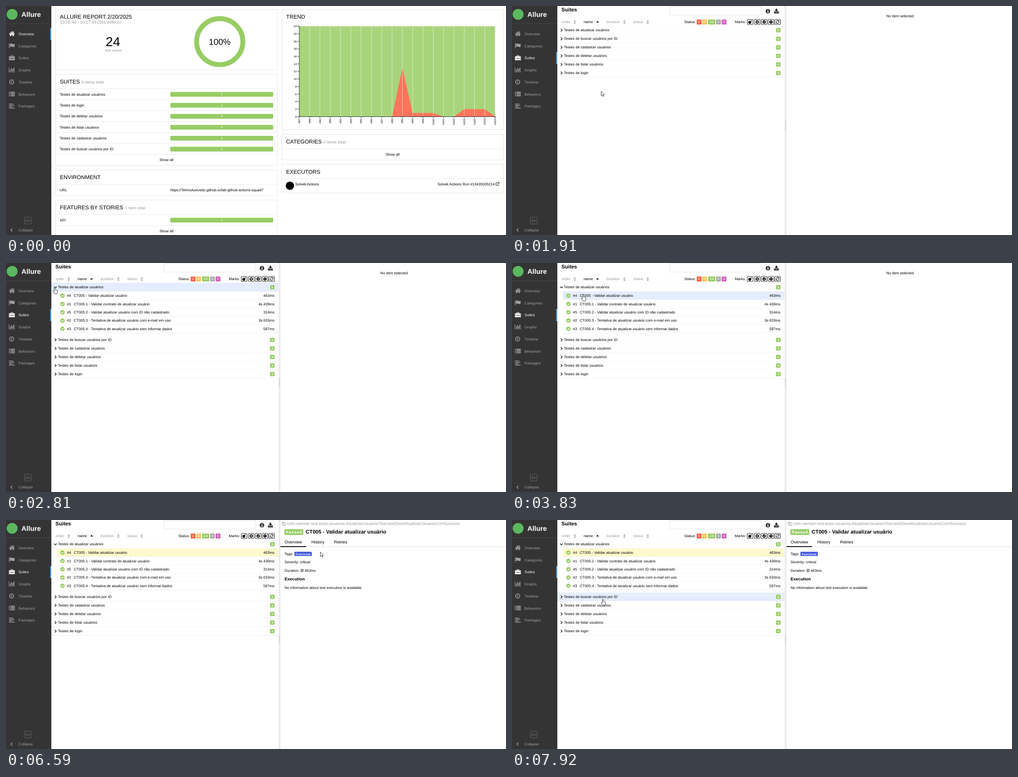
These frames come from a looping animation (1103 by 508 pixels, 7.99 s). An HTML page:

```html
<!DOCTYPE html>
<html lang="en">
<head>
<meta charset="utf-8">
<title>Allure report</title>
<style>
html, body { margin: 0; width: 100%; height: 100%; overflow: hidden; background: #fff; }
svg { display: block; width: 1103px; height: 508px; }
text { font-family: "Liberation Sans", Arial, sans-serif; text-rendering: geometricPrecision; white-space: pre; }
</style>
</head>
<body>
<svg id="stage" viewBox="0 0 1103 508" xmlns="http://www.w3.org/2000/svg"></svg>
<script>
const LOOP = 7990, BODY = 8.1;
const GREEN = '#97cc64', GREY = '#999', LINE = '#e9e9e9', HOVER = '#e4edfd', PICKED = '#fff9cd';

// Drawing helpers; text is placed by its vertical middle
const rect = (x, y, w, h, fill, more = '') =>
  `<rect x="${x}" y="${y}" width="${w}" height="${h}" fill="${fill}" ${more}/>`;
const circle = (x, y, r, fill, more = '') =>
  `<circle cx="${x}" cy="${y}" r="${r}" fill="${fill}" ${more}/>`;
const path = (d, fill, more = '') => `<path d="${d}" fill="${fill}" ${more}/>`;
const stroke = (d, color, width = 1, more = '') =>
  path(d, 'none', `stroke="${color}" stroke-width="${width}" ${more}`);
const text = (x, y, s, size = BODY, fill = '#000', more = '') =>
  `<text x="${x}" y="${y + size * 0.345}" font-size="${size}" fill="${fill}" ${more}>${s}</text>`;
const MID = 'text-anchor="middle"', END = 'text-anchor="end"', BOLD = 'font-weight="700"';
const hline = (x1, x2, y, color = LINE) => stroke(`M${x1} ${y}H${x2}`, color);
const at = (x, y, body) => `<g transform="translate(${x} ${y})">${body}</g>`;

// Sidebar
const ICONS = [
  c => path('M-6.5 .5L0-5.5L2.7-3V-5H4.3V-1.5L6.5.5L5.7 1.4L0-3.8L-5.7 1.4ZM-4.5 1.3L0-2.8L4.5 1.3V5H1.2V2H-1.2V5H-4.5Z', c),
  c => path('M-6.3-5.5H-5V5.5H-6.3ZM-4.3-4C-2-5.5 0-5 1.5-4C3-3.4 4.5-4 6-4.6V2C4 3.2 2.5 3 1 2.3C-1 1.3-2.5 2-4.3 2.8Z', c),
  c => path('M-2.8-3.3V-5.5H2.8V-3.3H6.5V.4H-6.5V-3.3ZM-1.6-3.3H1.6V-4.4H-1.6ZM-6.5 1.3H-1.5V2.3H1.5V1.3H6.5V5.2H-6.5Z', c, 'fill-rule="evenodd"'),
  c => stroke('M-6.3-5.5V4.5H7', c, 1.1) +
    stroke('M-3.5 3V-.2M-.8 3V-4M1.9 3V-2M4.6 3V-5', c, 1.8),
  c => circle(-.5, 0, 4.6, 'none', `stroke="${c}" stroke-width="1.6"`) + stroke('M-.2-2.6V.6H-2.6', c, 1.2),
  c => stroke('M-6.5-4H-4.5M-6.5-1.3H-4.5M-6.5 1.4H-4.5M-6.5 4.1H-4.5M-3.2-4H6.5M-3.2-1.3H6.5M-3.2 1.4H6.5M-3.2 4.1H6.5', c, 1.8),
  c => stroke('M-6.3-4.5H3M-6.3-1.5H5.5M-6.3 1.5H1.5M-6.3 4.5H6.5', c, 1.7)
];
const MENU = ['Overview', 'Categories', 'Suites', 'Graphs', 'Timeline', 'Behaviors', 'Packages'];

function sidebar(active) {
  let s = rect(0, 0, 100, 508, '#343434') + hline(0, 100, 39.5, '#484848') +
    circle(13.5, 18.5, 12, '#5cb860') + text(34, 19, 'Allure', 15.2, '#fff', BOLD);
  MENU.forEach((name, i) => {
    const y = 62 + i * 26.75, on = i === active, c = on ? '#fff' : '#a0a0a0';
    if (on) s += rect(97.5, y - 13.5, 2.5, 27, '#5fa9ec');
    s += at(13, y - 0.5, ICONS[i](c)) + text(27.5, y, name, 8.2, c);
  });
  return s + rect(40.5, 468.5, 15, 15, 'none', 'stroke="#666" rx="1"') +
    text(48, 476, 'En', BODY, '#777', MID) +
    stroke('M14 494L10.7 497.3L14 500.6', '#bbb', 1.2) + text(27.5, 497.5, 'Collapse', 8.2, '#a0a0a0');
}

// Overview page
const SUITES = [['atualizar usuários', 5], ['login', 4], ['deletar usuários', 4],
  ['listar usuários', 4], ['cadastrar usuários', 4], ['buscar usuários por ID', 3]];
const PITCH = 24.3;
const card = (x, y, h) => rect(x + .5, y + .5, 489, h, '#fff', 'stroke="#e4e4e4"');
const heading = (x, y, title, note = '', gap = 0) =>
  text(x, y, title, 12.15) + text(x + gap, y + 1, note, 9.15, GREY);
const bar = (y, n) => rect(362.5, y - 5.2, 227, 10.5, GREEN, 'rx="2"') + text(476, y, n, 7, '#fff', MID);

function trend() {
  const px = i => 647 + i * 432 / 19, py = v => 245.5 - v * 200.5 / 24;
  const failed = [0, 0, 0, 0, 0, 0, 0, 0, 0, 0, 13, 1, 1, 1, 0, 0, 2, 2, 2, 0];
  const runs = [87, 88, 90, 89, 92, 94, 95, 96, 97, 98, 99, 99, 99, 100, 101, 102, 103, 103, 103, 103];
  let s = rect(647, 45, 432, 200.5, '#a8d47b') +
    path('M647 245.5' + failed.map((v, i) => `L${px(i)} ${py(v)}`).join('') + 'Z', '#fe745c');
  runs.forEach((n, i) => {
    const x = px(i);
    if (i) s += stroke(`M${x} 45V245.5`, '#fff', 1, 'opacity=".6"');
    s += stroke(`M${x} 245V249`, '#000', .8) +
      `<g transform="translate(${x} 250.5) rotate(-90)">${text(0, 0, '#' + n, 6, '#000', END)}</g>`;
  });
  for (let v = 0; v <= 24; v += 2)
    s += stroke(`M643 ${py(v)}H647`, '#000', .8) + text(641.5, py(v), v, 6.2, '#000', END);
  return s + stroke('M643 45H647V245.5H1079V249', '#000', .8);
}

function overview(hover) {
  let s = card(109, 7, 134) + text(119, 23.5, 'ALLURE REPORT 2/20/2025', 12.2) +
    text(119, 35.5, '10:16:48 - 10:17:45 (56s 948ms)', 9.25, GREY) +
    text(236, 79.5, '24', 28.6, '#000', MID) + text(236.5, 98.5, 'test cases', BODY, GREY, MID) +
    circle(471.5, 79, 51, 'none', `stroke="${GREEN}" stroke-width="10.8"`) +
    text(471.5, 80, '100%', 18.7, '#000', MID);

  s += card(109, 151, 202) + heading(119, 167.5, 'SUITES', '6 items total', 47.5);
  if (hover) s += rect(110, hover.y, 488, hover.h, HOVER);
  SUITES.forEach(([name, n], i) => {
    const y = 196 + i * PITCH;
    s += hline(110, 598, 183.5 + i * PITCH) + text(118.5, y, 'Testes de ' + name) + bar(y, n);
  });
  s += hline(110, 598, 329.5) + text(354, 341.5, 'Show all', BODY, '#000', MID);

  s += card(109, 363, 57) + heading(119, 380, 'ENVIRONMENT') + hline(110, 598, 396) +
    text(118.5, 408, 'URL') + text(362.5, 408, 'https://TelmoAzevedo.github.io/lab-github-actions-squad7') +
    card(109, 430, 100) + heading(119, 447, 'FEATURES BY STORIES', '1 item total', 143.5) +
    hline(110, 598, 462.5) + text(118.5, 475, 'API') + bar(475, 1) + hline(110, 598, 487) +
    text(354, 499, 'Show all', BODY, '#000', MID);

  s += card(608, 7, 267) + heading(618, 23.5, 'TREND') + trend() +
    card(608, 284, 57) + heading(618, 301, 'CATEGORIES', '0 items total', 82) +
    hline(609, 1097, 317) + text(853, 329, 'Show all', BODY, '#000', MID) +
    card(608, 350, 64) + heading(618, 367.5, 'EXECUTORS') + hline(609, 1097, 383) +
    circle(626.3, 398.7, 9.2, '#000') + text(638, 395.5, 'Solvek Actions') +
    text(1078, 395.5, 'Solvek Actions Run #13435005214', BODY, '#000', END) +
    stroke('M1084 392.2H1080.7V398.2H1086.7V395.5M1083 396L1087.5 391.5M1084.8 391.3H1087.7V394.2', '#222', 1);
  return s;
}

// Suites page
const TREE = [['atualizar usuários', 5], ['buscar usuários por ID', 3], ['cadastrar usuários', 4],
  ['deletar usuários', 4], ['listar usuários', 4], ['login', 4]];
const CASES = [[4, 'CT005 - Validar atualizar usuário', '463ms'],
  [1, 'CT005.1 - Validar contrato de atualizar usuário', '4s 439ms'],
  [5, 'CT005.2 - Validar atualizar usuário com ID não cadastrado', '314ms'],
  [2, 'CT005.3 - Tentativa de atualizar usuário com e-mail em uso', '3s 633ms'],
  [3, 'CT005.4 - Tentativa de atualizar usuário sem informar dados', '587ms']];

function sorter(x, label, arrowX, on) {
  const up = `M${arrowX - 2.8} 34.8h5.6l-2.8-3Z`;
  const down = `M${arrowX - 2.8} 36.8h5.6l-2.8 3Z`;
  return text(x, 35.5, label, 8.2, on ? '#000' : GREY) +
    (on ? path(`M${arrowX - 3} 36.4h6l-3-3.4Z`, '#000') : path(up + down, GREY));
}

function marks() {
  const box = x => rect(x - 6.2, 29.8, 12.4, 11.2, '#fff', 'stroke="#222" stroke-width="1.1" rx="1.5"');
  const disc = (x, sign) => box(x) + circle(x, 35.4, 3.7, '#111') + at(x, 35.4, stroke(sign, '#fff', 1.1));
  return box(525.3) + circle(524.6, 36.2, 3.3, '#111') + stroke('M526.5 34L528.8 31.8', '#111', 1.4) +
    disc(541, 'M-1.4-1.4L1.4 1.4M1.4-1.4L-1.4 1.4') + disc(556.3, 'M-1.8 0L-.4 1.4L2-1.2') +
    disc(571.3, 'M0-2.3V.6M0 1.3V2.3') + box(586) +
    at(586, 35.4, stroke('M-3.2-.8A3.3 3.3 0 0 1 2.5-2M3.2.8A3.3 3.3 0 0 1-2.5 2', '#111', 1.2) +
      path('M3.7-3.6V-.5H.6ZM-3.7 3.6V.5H-.6Z', '#111'));
}

function toolbar() {
  const counts = [[407.5, 10.5, '#fd5a3e', 0], [419.7, 10.5, '#ffc34e', 0], [432.5, 15.8, GREEN, 24],
    [450.2, 10.5, '#aaa', 0], [462.5, 10.5, '#d35ebe', 0]];
  return text(109, 8.5, 'Suites', 11.5, '#000', BOLD) + rect(348, 1.5, 202, 18.5, '#fff', 'stroke="#e2e2e2"') +
    circle(564.6, 11.6, 5, '#333') + stroke('M563.3 10.7H564.8V14M563 14.2H566.4M564 8.5H565.5', '#fff', 1.3) +
    path('M581.5 6H585V9.5H587.7L583.3 13.5L579 9.5H581.5Z', '#333') +
    path('M577.8 12.3H580.6L583.3 14.6L586 12.3H588.7V16.5H577.8Z', '#333') +
    sorter(109.5, 'order', 138.5) + sorter(158, 'name', 188.8, true) +
    sorter(208, 'duration', 248) + sorter(267.5, 'status', 299.5) +
    text(380, 35.5, 'Status:') +
    counts.map(([x, w, c, n]) => rect(x, 30, w, 11, c, 'rx="1.5"') + text(x + w / 2, 35.6, n, BODY, '#fff', MID)).join('') +
    text(491.5, 35.5, 'Marks:') + marks() + hline(100, 601, 44.5);
}

// Rows that react to the pointer
function rowsOf(page, open) {
  if (page === 'overview')
    return [0, 1, 2, 3, 4, 5, 6].map(i => ({ x: 110, y: 183.5 + i * PITCH, h: i < 6 ? PITCH : 24, end: 598 }));
  const rows = TREE.map((item, i) => ({
    x: 100, y: open && i ? 142 + i * 19 : 44.2 + i * 19, h: 19, end: 601, item, open: open && !i
  }));
  if (open) CASES.forEach((test, i) =>
    rows.push({ x: 112, y: 63.3 + i * 18.4, h: 18.4, end: 601, test, picked: !i }));
  return rows;
}

function rowView(r, hovered, selected) {
  const mid = r.y + r.h / 2;
  const back = hovered ? HOVER : r.picked && selected ? PICKED : '#fff';
  let s = rect(r.x, r.y, r.end - r.x, r.h, back) + hline(r.x, r.end, r.y + r.h, '#eee');
  if (r.test) {
    const [n, name, time] = r.test;
    return s + circle(124.5, mid, 4.9, GREEN) +
      at(124.5, mid, stroke('M-2.4 0L-.6 1.8L2.5-1.5', '#fff', 1.4)) +
      text(134.5, mid, '#' + n) + text(149.5, mid, name) + text(592, mid, time, BODY, '#000', END);
  }
  const [name, n] = r.item;
  return s + at(109, mid, stroke(r.open ? 'M-3-1.4L0 1.6L3-1.4' : 'M-1.3-3L1.7 0L-1.3 3', '#111', 1.3)) +
    text(114.5, mid - .2, 'Testes de ' + name) + rect(582.5, mid - 4.8, 9.8, 9.6, GREEN, 'rx="1.5"') +
    text(587.4, mid + .1, n, 6.6, '#fff', MID + ' ' + BOLD);
}

function details() {
  return stroke('M611.5 10.5H609V4.5H614V6.5M611.7 6.7H617V12.7H611.7Z', GREY, .9) +
    text(620, 8.3, 'com.vemser.rest.tests.usuarios.AtualizarUsuariosTest.testDeveAtualizarUsuarioComSucesso', 9.26, GREY) +
    rect(614.3, 20.6, 41.4, 12.6, GREEN, 'rx="1.5"') +
    text(617.3, 27, 'Passed', 9.2, '#fff', BOLD + ' letter-spacing=".65"') +
    text(661, 26.5, 'CT005 - Validar atualizar usuário', 11.55, '#000', BOLD) +
    text(614.7, 48.5, 'Overview', 9.25) + text(673.7, 48.5, 'History', 9.25) + text(723.5, 48.5, 'Retries', 9.25) +
    hline(605, 1103, 59.5, '#e0e0e0') + rect(605.5, 58, 56.5, 2, '#111') +
    text(614.5, 75, 'Tags:') + rect(636.3, 70.5, 38.2, 9.3, '#3b55dc', 'rx="1.5"') +
    text(639.3, 75.3, 'Funcional', 6.4, '#fff', BOLD + ' letter-spacing=".25"') +
    text(614.5, 93.3, 'Severity: critical') + text(614.5, 112, 'Duration:') +
    circle(653.2, 112, 2.9, 'none', 'stroke="#111"') + stroke('M653.4 110.3V112.4H651.8', '#111', .8) +
    text(658.7, 112, '463ms') + text(614.5, 131, 'Execution', 9.4, '#000', BOLD) +
    text(614.5, 150.5, 'No information about test execution is available.');
}

function suitesPage(rows, hover, shown) {
  let s = toolbar() + rows.map(r => rowView(r, r === hover, shown)).join('') +
    rect(601.5, 0, 4, 508, '#ebebeb');
  for (let y = 256; y < 273; y += 2.7) s += rect(602.4, y, 2.4, 1, '#bbb');
  return s + (shown ? details() : text(856, 22, 'No item selected', BODY, '#000', MID));
}

// Pointer: start, end, number of steps, way points
const MOVES = [
  [130, 830, 11, [1045, 610, 900, 300, 640, 168, 440, 230, 360, 344]],
  [1500, 2260, 11, [360, 343, 292, 278, 209, 202, 152, 135, 118, 72]],
  [2330, 2540, 4, [118, 72, 107.5, 54.3]],
  [3140, 3630, 7, [107.5, 54.3, 133, 60, 157, 70.3]],
  [4360, 5130, 12, [157, 70.3, 300, 68, 430, 72, 600, 80, 694, 88]],
  [5200, 5970, 12, [694, 88, 697, 105.7, 670, 168, 651, 125, 690, 70, 737, 110, 722, 150]],
  [6040, 6800, 12, [722, 150, 670, 171, 649, 120, 680, 69, 718, 95, 719, 142]],
  [6870, 7640, 12, [719, 142, 560, 183, 400, 202, 272, 181.3, 185, 146]],
  [7710, 7920, 4, [185, 146, 181, 156, 200.5, 175.3]]
];

function along(pts, u) {
  const n = pts.length / 2 - 1, i = Math.min(n - 1, Math.floor(u * n)), f = u * n - i;
  return [0, 1].map(axis => {
    const p = k => pts[2 * Math.max(0, Math.min(n, k)) + axis];
    const a = p(i), b = p(i + 1), ma = (b - p(i - 1)) / 2, mb = (p(i + 2) - a) / 2;
    return a + f * (ma + f * (3 * (b - a) - 2 * ma - mb + f * (2 * (a - b) + ma + mb)));
  });
}

function pointer(t) {
  const move = MOVES.filter(m => m[0] <= t).pop();
  if (!move) return null;
  const [start, end, n, pts] = move;
  const step = Math.min(n - 1, Math.floor((t - start) / (end - start) * (n - 1) + 1e-6));
  return along(pts, (step + 1) / n);
}

const HAND = 'M-1.1 1.1A1.1 1.1 0 0 1 1.1 1.1V5C1.7 4.4 2.8 4.7 2.9 5.4C3.5 4.9 4.5 5.2 4.6 6C5.3 5.6 6 6 6 6.9V9.7C6 11.5 5 12 5 13.8H-1C-1 12.2-2.3 11.6-3.4 9.3C-4.1 7.8-2.9 7-2 7.8L-1.1 8.8Z';
const ARROW = 'M0 0V10L2.3 7.9L3.9 11.5L5.4 10.9L3.9 7.3H7.1Z';

const stage = document.getElementById('stage');
stage.innerHTML = '<g id="page"></g><g id="cursor"></g>';
const [pageNode, cursorNode] = stage.children;
let lastKey = '';

function render(t) {
  const page = t < 1170 ? 'overview' : 'suites', open = t >= 2810, shown = t >= 4030;
  const pos = pointer(t), rows = rowsOf(page, open);
  const index = pos ? rows.findIndex(r =>
    pos[0] >= r.x && pos[0] < r.end && pos[1] >= r.y && pos[1] < r.y + r.h) : -1;
  const hover = rows[index];
  const key = [page, open, shown, index].join();
  if (key !== lastKey) {
    lastKey = key;
    pageNode.innerHTML = page === 'overview'
      ? overview(hover) + sidebar(0)
      : suitesPage(rows, hover, shown) + sidebar(2);
  }
  cursorNode.innerHTML = pos
    ? at(pos[0], pos[1], path(hover ? HAND : ARROW, '#fff', 'stroke="#111" stroke-width=".8" stroke-linejoin="round"'))
    : '';
}

const began = performance.now();
function tick() {
  render((performance.now() - began) % LOOP);
  requestAnimationFrame(tick);
}
tick();
</script>
</body>
</html>
```
